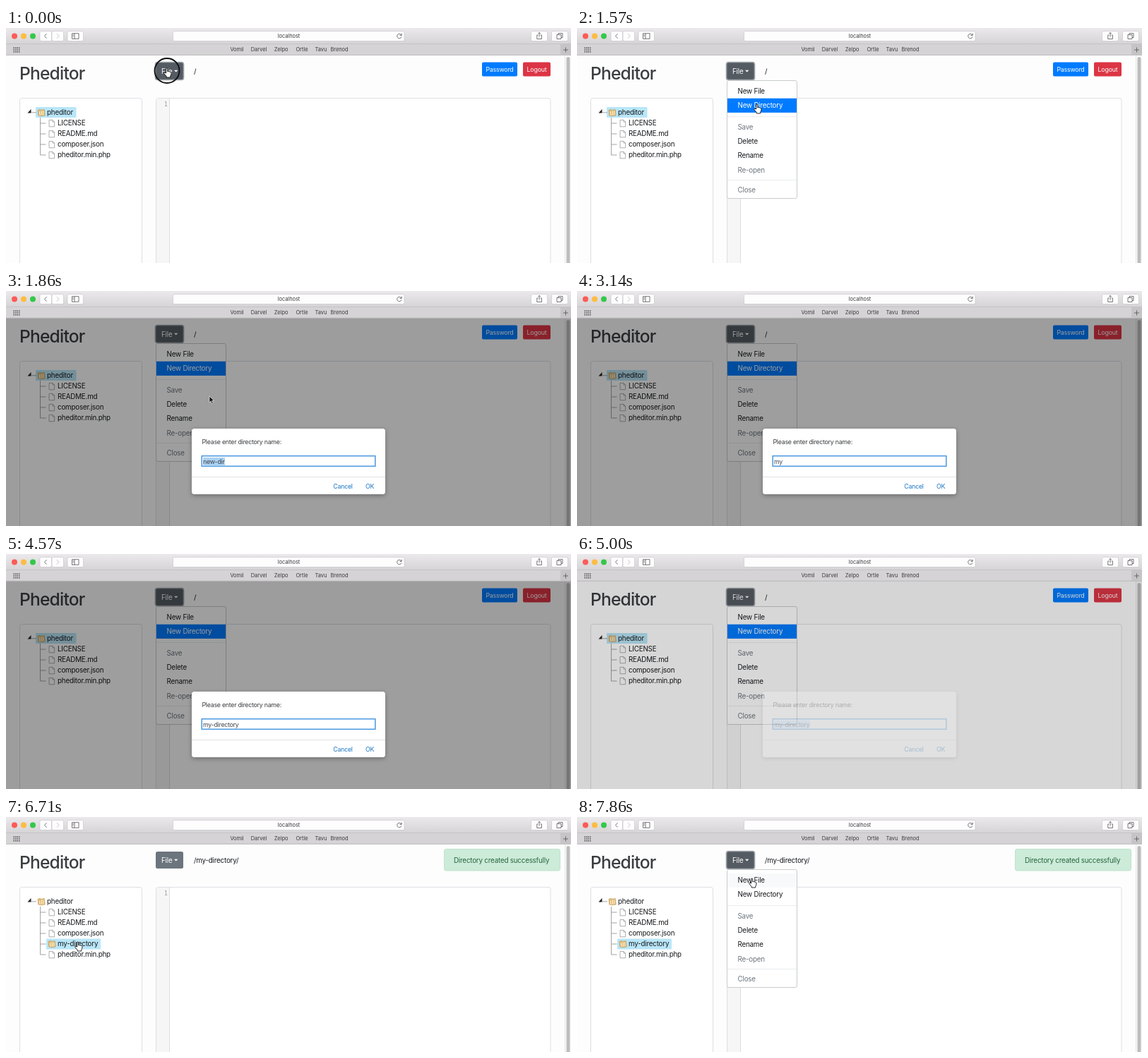
Recreate the animation shown at these times as an HTML page. Size 800 px wide and 333 px high, loop 8 s.

```html
<!DOCTYPE html>
<html lang="en">
<head>
<meta charset="utf-8">
<title>Pheditor</title>
<style>
html, body { margin: 0; width: 100%; height: 100%; overflow: hidden; background: #fdfdfe; }
svg { position: absolute; left: 0; top: 0; display: block; }
text, #field { font: 9.8px Inter, "Liberation Sans", sans-serif; letter-spacing: -.2px; fill: #17191c; white-space: pre; }
.mid { text-anchor: middle; }
.bar text { font-size: 7.4px; letter-spacing: 0; fill: #3c3b3c; }
.btn { font-size: 8.8px; fill: #fff; }
.off { fill: #6c757d; }
.key { fill: #fdfdfe; }
.line { fill: none; stroke: #555; stroke-width: .8; }
.dlg text, #field { font-size: 8.8px; letter-spacing: -.25px; }
.dlg text { fill: #3a3c3f; }
.dlg .link { fill: #1b76c4; }
#field { position: absolute; left: 279px; top: 236px; height: 11px; line-height: 11px; color: #3f444a; }

/* one loop is 56 ticks of 1/7 s */
.t, #field, #field::after { animation: 8s step-end infinite; }
#menu { animation-name: menu; }
#press { animation-name: press; }
#overFile { animation-name: overFile; }
#overDir { animation-name: overDir; }
#dim { animation-name: dim; }
.dlg, #field { animation-name: dialog; }
#field::after { content: "new-dir"; animation-name: type; }
#rootPath { animation-name: early; }
#dirPath, #dirSel { animation-name: late; }
#rootSel { animation-name: rootSel; }
#dirRow { animation-name: added; }
#lastRow { animation-name: shift; }
#toast { animation-name: toast; }
#pointer { animation-name: move; }
#hand { animation-name: hand; }
#arrow { animation-name: arrow; }
#ring { animation-name: ring; }

@keyframes menu { 0% { opacity: 0 } 1.65% { opacity: 1 } 64.2% { opacity: 0 } 94.5% { opacity: 1 } }
@keyframes press { 0% { opacity: 1 } 64.2% { opacity: 0 } 92.75% { opacity: 1 } }
@keyframes overFile { 0% { opacity: 0 } 10.6% { opacity: 1 } 14.2% { opacity: 0 } 96.3% { opacity: 1 } }
@keyframes overDir {
  0% { fill: #fff; color: #17191c } 14.2% { fill: #f3f4f6; color: #17191c }
  19.5% { fill: #007bff; color: #fff } 64.2% { fill: #fff; color: #17191c }
}
@keyframes dim { 0% { opacity: 0 } 23.1% { opacity: 1 } 62.4% { opacity: .41 } 64.2% { opacity: 0 } }
@keyframes dialog { 0% { opacity: 0 } 23.1% { opacity: 1 } 62.4% { opacity: .27 } 64.2% { opacity: 0 } }
@keyframes type {
  0% { content: "new-dir"; background: #abd2f3 }
  37.4% { content: "m"; background: none }
  39.2% { content: "my"; background: none }
  42.75% { content: "my-"; background: none }
  44.5% { content: "my-d"; background: none }
  46.3% { content: "my-di"; background: none }
  48.1% { content: "my-dir"; background: none }
  49.9% { content: "my-dire"; background: none }
  51.7% { content: "my-direc"; background: none }
  53.45% { content: "my-direct"; background: none }
  55.25% { content: "my-director"; background: none }
  57.05% { content: "my-directory"; background: none }
  62.4%, 100% { content: "my-directory"; background: #abd2f3 }
}
@keyframes early { 0% { opacity: 1 } 64.2%, 100% { opacity: 0 } }
@keyframes late { 0% { opacity: 0 } 83.85%, 100% { opacity: 1 } }
@keyframes rootSel { 0% { opacity: 1 } 83.85%, 100% { opacity: 0 } }
@keyframes added { 0% { opacity: 0 } 65.95%, 100% { opacity: 1 } }
@keyframes shift { 0% { transform: none } 65.95%, 100% { transform: translateY(15px) } }
@keyframes toast { 0% { opacity: 0 } 65.95% { opacity: .5 } 67.75%, 100% { opacity: 1 } }
@keyframes move {
  0% { transform: translate(228px, 57px) }
  3.45% { transform: translate(228px, 57px); animation-timing-function: steps(7) }
  15.95% { transform: translate(255px, 108px) }
  23.1% { transform: translate(288px, 149px) }
  24.9% { transform: translate(284px, 152px) }
  26.7% { transform: translate(282px, 155px) }
  73.1% { transform: translate(282px, 155px); animation-timing-function: steps(4) }
  80.25% { transform: translate(102px, 177px) }
  83.85% { transform: translate(102px, 177px); animation-timing-function: steps(4) }
  91% { transform: translate(228px, 57px) }
  94.5% { transform: translate(228px, 57px); animation-timing-function: steps(2) }
  98.1%, 100% { transform: translate(248px, 87px) }
}
@keyframes hand { 0% { opacity: 1 } 23.1% { opacity: 0 } 80.25% { opacity: 1 } 85.6% { opacity: 0 } 91%, 100% { opacity: 1 } }
@keyframes arrow {
  0% { opacity: 0 } 23.1% { opacity: 1 } 32% { opacity: 0 } 65.95% { opacity: 1 }
  80.25% { opacity: 0 } 85.6% { opacity: 1 } 91%, 100% { opacity: 0 }
}
@keyframes ring {
  0% { opacity: 1 } 3.45% { opacity: 0 } 21.3% { opacity: 1 } 23.1% { opacity: 0 }
  82.05% { opacity: 1 } 83.85% { opacity: 0 } 92.75% { opacity: 1 } 94.5%, 100% { opacity: 0 }
}
</style>
</head>
<body>
<svg width="800" height="333" viewBox="0 0 800 333">
  <defs>
    <linearGradient id="chrome" x2="0" y2="1">
      <stop stop-color="#ebe9eb"/><stop offset="1" stop-color="#d5d3d5"/>
    </linearGradient>
    <filter id="shadow" x="-10%" y="-20%" width="120%" height="150%">
      <feDropShadow dx="0" dy="2" stdDeviation="3" flood-opacity=".3"/>
    </filter>
    <g id="file">
      <path d="M-12 0h8" stroke="#999" stroke-width=".9"/>
      <path d="M.5-4.6h5l2.6 2.6v6.8H.5zM5.5-4.6V-2h2.6" fill="#fff" stroke="#9a9a9a" stroke-width=".8"/>
    </g>
    <g id="folder">
      <path d="M0-3.6l3.6-1.2 1 1.2 4.6-.8 1 8.4-6.2.8L.8 4z" fill="#e3bd78" stroke="#b58d4c" stroke-width=".6"/>
      <path d="M2.4-1.5l.8 5.6M5.2-2.4l.5 6M7.6-2.6l.5 6" stroke="#fbf0d4" stroke-width="1.1"/>
    </g>
  </defs>

  <!-- page -->
  <rect width="800" height="333" fill="#fdfdfe"/>
  <text x="19" y="73.3" style="font-size:24.6px;font-weight:500;letter-spacing:-.8px;fill:#3b3d40">Pheditor</text>

  <g fill="#fff" stroke="#dcdfe3">
    <rect x="19.5" y="99.5" width="173" height="250" rx="3"/>
    <rect x="212.5" y="99.5" width="558.5" height="250" rx="3"/>
  </g>
  <path d="M213 103q0-3 3-3h15v233h-18z" fill="#f6f6f6"/>
  <path d="M231.5 100v233" stroke="#ddd"/>
  <text x="224" y="111" style="font:8px 'DejaVu Sans Mono',monospace;fill:#999">1</text>

  <!-- tree -->
  <rect id="rootSel" class="t" x="42" y="112" width="57.5" height="15" rx="1" fill="#b9e6f8"/>
  <path d="M36 119.8h7M48.5 127v53" fill="none" stroke="#999" stroke-width=".9"/>
  <path d="M35.5 115v5.5H30.5z" fill="#222"/>
  <use href="#folder" x="45" y="120"/>
  <text x="58" y="123.3">pheditor</text>
  <g id="rows">
    <use href="#file" x="60.5" y="135"/><text x="73" y="138.3">LICENSE</text>
    <use href="#file" x="60.5" y="150"/><text x="73" y="153.3">README.md</text>
    <use href="#file" x="60.5" y="165"/><text x="73" y="168.3">composer.json</text>
  </g>
  <g id="dirRow" class="t">
    <rect id="dirSel" class="t" x="57" y="172.5" width="77" height="15" rx="1" fill="#b9e6f8"/>
    <path d="M48.5 180v15M48.5 180h8" stroke="#999" stroke-width=".9"/>
    <use href="#folder" x="60" y="180"/>
    <text x="73" y="183.3">my-directory</text>
  </g>
  <g id="lastRow" class="t">
    <use href="#file" x="60.5" y="180"/><text x="73" y="183.3">pheditor.min.php</text>
  </g>

  <!-- page header -->
  <rect x="212" y="49" width="39" height="24" rx="2.5" fill="#6c757d"/>
  <rect id="press" class="t" x="211.5" y="48.5" width="40" height="25" rx="3" fill="#545b62" stroke="#9ea4a9" stroke-width="1.6"/>
  <text x="220" y="64.5" fill="#fff" style="fill:#fff">File</text>
  <path d="M238 59.7h5.4l-2.7 2.9z" fill="#fff"/>
  <text id="rootPath" class="t" x="266" y="64.5">/</text>
  <text id="dirPath" class="t" x="266" y="64.5">/my-directory/</text>
  <rect x="674" y="48.5" width="50" height="20" rx="2" fill="#007bff"/>
  <text class="btn mid" x="699" y="61.8">Password</text>
  <rect x="732" y="48.5" width="39" height="20" rx="2" fill="#dc3545"/>
  <text class="btn mid" x="751.5" y="61.8">Logout</text>
  <g id="toast" class="t">
    <rect x="620.5" y="45.5" width="164" height="30.5" rx="2.5" fill="#cdebd9" stroke="#bfe3cb"/>
    <text x="634" y="64.5" style="fill:#25653f">Directory created successfully</text>
  </g>

  <!-- menu -->
  <g id="menu" class="t">
    <rect x="212.5" y="74.5" width="99" height="167" rx="2.5" fill="#fff" stroke="#c9cbce"/>
    <rect id="overFile" class="t" x="213" y="80" width="98" height="19.7" fill="#f8f9fa"/>
    <g id="overDir" class="t">
      <rect x="213" y="99.7" width="98" height="20.2"/>
      <text x="227.5" y="113.4" style="fill:currentColor">New Directory</text>
    </g>
    <path d="M213 125.5h98M213 215.5h98" stroke="#e9ecef"/>
    <text x="227.5" y="93.2">New File</text>
    <text class="off" x="227.5" y="144.2">Save</text>
    <text x="227.5" y="164.2">Delete</text>
    <text x="227.5" y="184.4">Rename</text>
    <text class="off" x="227.5" y="204.5">Re-open</text>
    <text class="off" x="227.5" y="232.5">Close</text>
  </g>

  <rect x="791" y="38" width="9" height="295" fill="#fafafa"/>
  <path d="M791.5 38v295" stroke="#e6e6e6"/>
  <rect x="793.5" y="41" width="5" height="300" rx="2.5" fill="#bdbdbd"/>

  <rect id="dim" class="t" y="38" width="800" height="295" fill="#000" fill-opacity=".38"/>

  <!-- prompt -->
  <g class="dlg t">
    <rect x="263" y="195" width="274" height="93" rx="4" fill="#fff" filter="url(#shadow)"/>
    <path d="M263 263.5h274" stroke="#e2e2e4"/>
    <text x="277.5" y="217.2">Please enter directory name:</text>
    <rect x="277.2" y="233.7" width="245.6" height="14.6" fill="#fff" stroke="#4a98e0" stroke-width="1.5"/>
    <text class="link mid" x="477" y="280">Cancel</text>
    <text class="link mid" x="515" y="280">OK</text>
  </g>

  <!-- browser chrome -->
  <g class="bar">
    <rect width="800" height="23" fill="url(#chrome)"/>
    <rect y="22.5" width="800" height="16" fill="#d5d3d5"/>
    <path d="M0 22.5h800" stroke="#c3c1c3" stroke-width=".8"/>
    <path d="M0 38.3h800" stroke="#b2b0b2" stroke-width=".8"/>
    <rect x="785" y="23" width="15" height="15" fill="#c6c4c6"/>
    <path d="M792.5 27.5v7M789 31h7" class="line"/>
    <circle cx="12" cy="11.5" r="4" fill="#fc5b57"/>
    <circle cx="25" cy="11.5" r="4" fill="#fdbc40"/>
    <circle cx="38" cy="11.5" r="4" fill="#34c84a"/>
    <g stroke="#c4c2c4" stroke-width=".6">
      <rect class="key" x="48" y="4.5" width="16.5" height="14" rx="2"/>
      <rect class="key" x="65" y="4.5" width="16.5" height="14" rx="2"/>
      <rect class="key" x="87" y="4.5" width="22.5" height="14" rx="2"/>
      <rect class="key" x="236.5" y="4.5" width="327.5" height="14" rx="2"/>
      <rect class="key" x="743.5" y="4.5" width="23" height="14" rx="2"/>
      <rect class="key" x="772.5" y="4.5" width="23" height="14" rx="2"/>
    </g>
    <g class="line">
      <path d="M57.5 8.3l-3 3.2 3 3.2"/>
      <path d="M72 8.3l3 3.2-3 3.2" stroke="#b5b5b5"/>
      <path d="M93.5 7.7h9.5v7.6h-9.5zM97 7.7v7.6M94.6 9.7h1.3M94.6 11.4h1.3"/>
      <path d="M559.8 10.2a3.2 3.2 0 1 0 .2 2.2M560.2 7.7v2.7h-2.7"/>
      <path d="M753.4 10h-1.6v5.5h6.6V10h-1.6M755.1 12.5V6.5M753.3 8.2l1.8-1.8 1.8 1.8"/>
      <path d="M780 9.5h6v6h-6zM782 9.5v-2h6v6h-2"/>
    </g>
    <path d="M10.5 28.3h9M10.5 31h9M10.5 33.7h9" stroke="#4a4a4a" stroke-width="1.5" stroke-dasharray="1.5 1"/>
    <text class="mid" x="400.5" y="14.2">localhost</text>
    <g class="mid">
      <text x="327" y="33.2">Vomil</text>
      <text x="358" y="33.2">Darvel</text>
      <text x="389.5" y="33.2">Zelpo</text>
      <text x="419" y="33.2">Ortle</text>
      <text x="446" y="33.2">Tavu</text>
      <text x="472" y="33.2">Brenod</text>
    </g>
  </g>

  <g id="pointer" class="t">
    <circle id="ring" class="t" cy="3.5" r="17.5" fill="none" stroke="#111" stroke-width="1.9"/>
    <path id="hand" class="t" d="M-1.3 7V1q0-1 1-1t1 1v3.6q1.7-.7 2 .3 1.6-.5 1.9.6 1.4-.2 1.4 1.2 0 3-1.3 4.6V13H-.8v-1.4L-4.2 7.6q-.5-1.4 1-1.3z" fill="#fff" stroke="#111" stroke-width=".9" stroke-linejoin="round"/>
    <path id="arrow" class="t" d="M0 0v9l2.1-1.9 1.5 3.3 1.6-.7-1.5-3.2h2.8z" fill="#111" stroke="#fff" stroke-width=".6"/>
  </g>
</svg>
<div id="field"></div>
</body>
</html>
```
